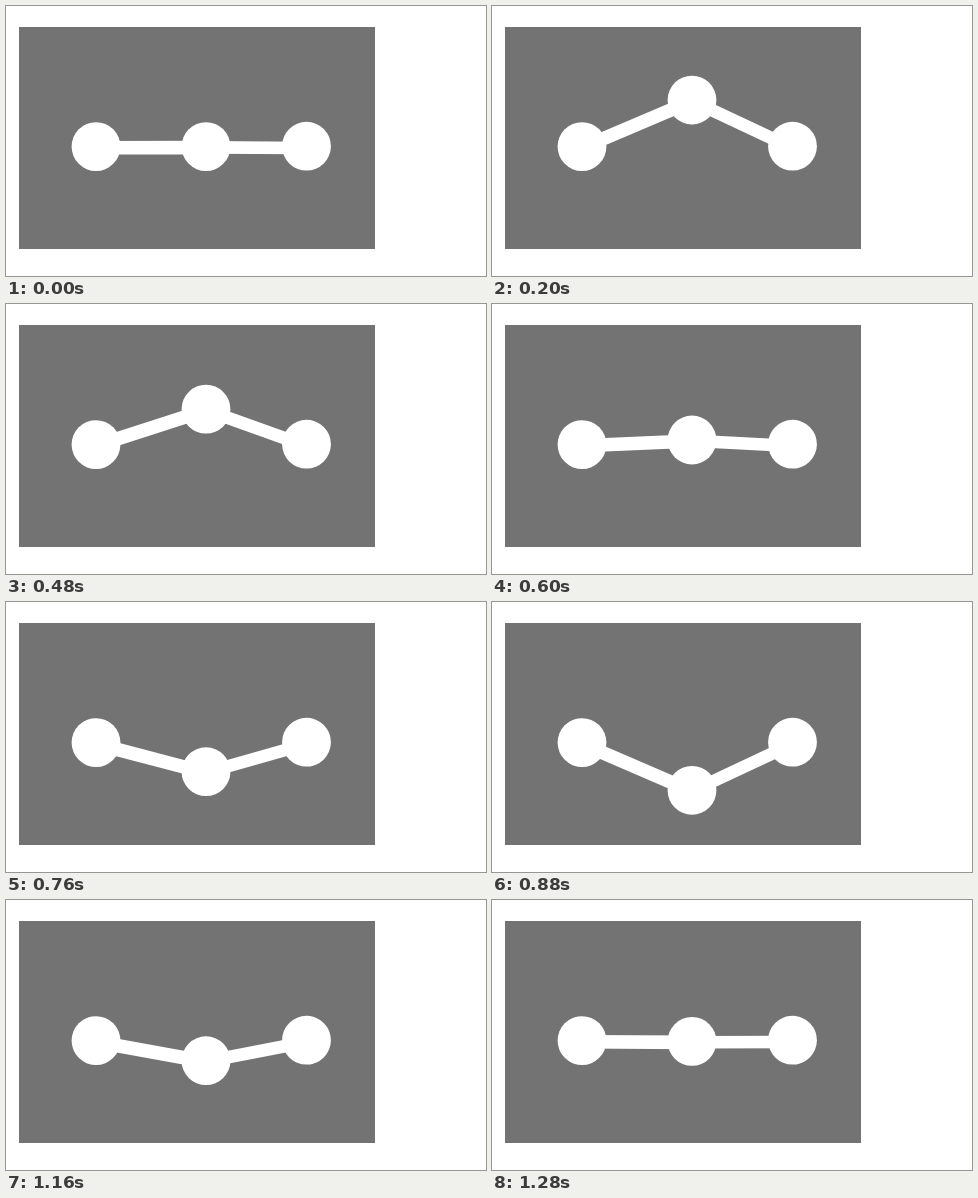
These frames come from a looping animation (480 px wide and 270 px high, 1320 ms). An HTML page:

```html
<!DOCTYPE html>
<html lang="en">
<head>
<meta charset="utf-8">
<title>Hinged nodes</title>
<style>
  html, body { margin: 0; width: 100%; height: 100%; overflow: hidden; background: #fff; }
  svg { display: block; width: 100vw; height: 100vh; }
</style>
</head>
<body>
<svg viewBox="0 0 480 270">
  <rect x="13" y="21" width="356" height="222" fill="#737373"/>
  <g stroke="#fff">
    <line id="left" x1="90" y1="141.8" x2="200" stroke-width="13.6"/>
    <line id="right" x1="300.5" y1="142" x2="200" stroke-width="12.6"/>
  </g>
  <g fill="#fff">
    <circle cx="90" cy="140.6" r="24.4"/>
    <circle id="mid" cx="200" r="24.4"/>
    <circle cx="300.5" cy="140.2" r="24.4"/>
  </g>
</svg>
<script>
  const LOOP = 1320, STEP = 40, REST = 140.6, SWING = 60;
  const [left, right, mid] = ['left', 'right', 'mid'].map(id => document.getElementById(id));

  // Cubic Bezier easing, solved by bisection.
  function bezier(x1, y1, x2, y2) {
    const at = (s, a, b) => 3 * (1 - s) * (1 - s) * s * a + 3 * (1 - s) * s * s * b + s * s * s;
    return x => {
      let lo = 0, hi = 1;
      for (let i = 0; i < 24; i++) {
        const s = (lo + hi) / 2;
        if (at(s, x1, x2) < x) lo = s; else hi = s;
      }
      return at((lo + hi) / 2, y1, y2);
    };
  }

  // Rest, up, down, rest.
  const moves = [
    { start: 0, end: 0.3, from: 0, to: -1, ease: bezier(0.25, 0.1, 0.29, 0.97) },
    { start: 0.3, end: 0.8, from: -1, to: 1, ease: bezier(0, 0, 0.57, 1) },
    { start: 0.8, end: 1, from: 1, to: 0, ease: bezier(0.27, 0.1, 0.25, 1) }
  ];

  function midY(t) {
    const p = t / LOOP;
    const m = moves.find(v => p < v.end);
    const k = m.ease((p - m.start) / (m.end - m.start));
    return REST + SWING * (m.from + (m.to - m.from) * k);
  }

  function draw(ms) {
    const t = Math.floor((ms % LOOP) / STEP) * STEP;
    const y = midY(t);
    mid.setAttribute('cy', y);
    left.setAttribute('y2', y + 1);
    right.setAttribute('y2', y + 0.8);
  }

  const begin = performance.now();
  function tick() {
    draw(performance.now() - begin);
    requestAnimationFrame(tick);
  }
  tick();
</script>
</body>
</html>
```
